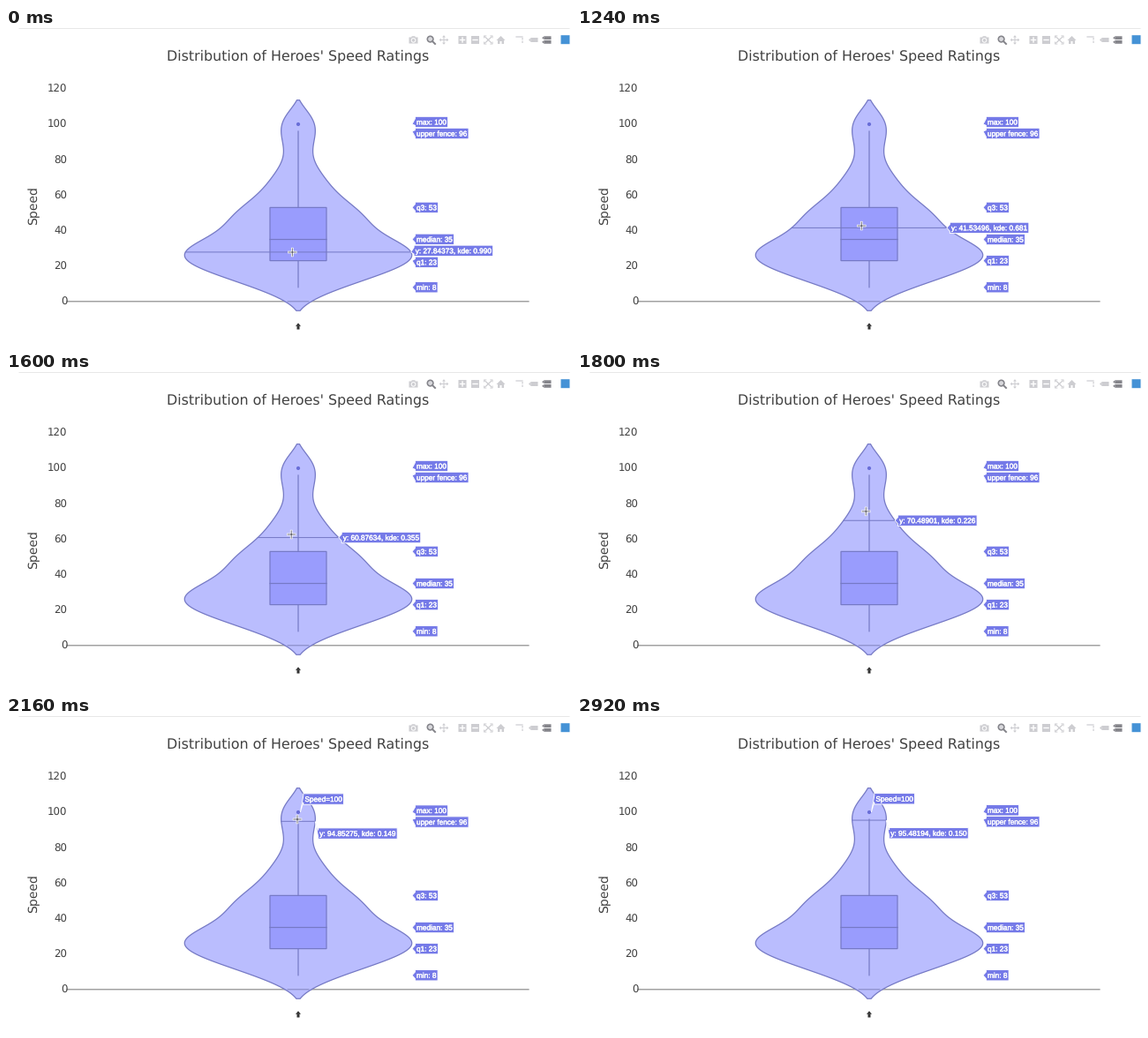
Recreate the animation shown at these times as a matplotlib script. Size 640 px wide and 358 px high, loop 2.96 s.

```python
import numpy as np
import matplotlib.pyplot as plt
from matplotlib.animation import FuncAnimation
from matplotlib.patches import Circle, Polygon, Rectangle
from matplotlib.patheffects import withStroke

W, H, DPI = 640, 358, 100
FRAMES, STEP = 74, 40
CX, ZERO, UNIT, PEAK = 331, 309.8, 2.008, 129
FILL, BOX, LINE, TAG = "#babdfe", "#999cfd", "#7579c5", "#757ae8"
INK, PALE, DARK, AXIS = "#414141", "#cdcdd1", "#85858b", "#8a8a8a"
STATS = {"max": 100, "upper fence": 96, "q3": 53, "median": 35, "q1": 23, "min": 8}

plt.rcParams["text.hinting"] = "none"
fig = plt.figure(figsize=(W / DPI, H / DPI), dpi=DPI, facecolor="white")
ax = fig.add_axes([0, 0, 1, 1])
ax.set_xlim(0, W)
ax.set_ylim(H, 0)
ax.axis("off")


def pt(px):
    return px * 72 / DPI


def to_y(value):
    return ZERO - value * UNIT


def line(xs, ys, color=LINE, px=1.0, z=3, **kw):
    return ax.plot(xs, ys, color=color, lw=pt(px), zorder=z, snap=False, **kw)[0]


def rect(x, y, w, h, color, z=2, edge="none", px=0):
    ax.add_patch(Rectangle((x, y), w, h, fc=color, ec=edge, lw=pt(px),
                           zorder=z, snap=False))


def disc(x, y, r, color, z=2, edge="none", px=0):
    ax.add_patch(Circle((x, y), r, fc=color, ec=edge, lw=pt(px), zorder=z))


def arrow_head(x, y, dx, dy, length, half, color):
    """Triangle with its tip at x, y, pointing along dx, dy."""
    tip, way, side = np.array([x, y]), np.array([dx, dy]), np.array([-dy, dx])
    base = tip - way * length
    ax.add_patch(Polygon([tip, base + side * half, base - side * half],
                         fc=color, ec="none", zorder=2))


def text(x, y, s, px, color=INK, font="DejaVu Sans", **kw):
    return ax.text(x, y, s, fontsize=pt(px), color=color, family=font,
                   va="baseline", **kw)


# Density: Gaussian kernels weighted to pass through a few known heights
CENTRES, HEIGHTS = np.array([
    (-5.2, .017), (3.5, .225), (11.5, .557), (19.4, .88), (27.844, .99),
    (38, .757), (47.978, .582), (54.8, .465), (60.876, .355), (69.7, .235),
    (78.179, .152), (87.2, .131), (94.853, .149), (104.6, .109), (113.6, .012)]).T
BANDWIDTH = 8.5


def kernels(v):
    return np.exp(-((np.atleast_1d(v)[:, None] - CENTRES) / BANDWIDTH) ** 2 / 2)


WEIGHTS = np.linalg.solve(kernels(CENTRES), HEIGHTS)


def density(v):
    return kernels(v) @ WEIGHTS


def draw_toolbar():
    y = 13.5
    # camera
    rect(456.5, 10.5, 10, 7, PALE)
    rect(459.5, 9.3, 4, 2, PALE)
    disc(461.5, 13.9, 2.3, PALE, 3, "white", 1)
    # magnifier
    disc(480.6, 12.6, 3.3, "#d8d8dc", 2, DARK, 1.6)
    line([483, 486], [15, 18], DARK, 2)
    # pan
    for dx, dy in ((1, 0), (-1, 0), (0, 1), (0, -1)):
        line([496, 496 + 4 * dx], [y, y + 4 * dy], PALE)
        arrow_head(496 + 5.3 * dx, y + 5.3 * dy, dx, dy, 2.2, 1.9, PALE)
    # zoom in and out
    for x in (517, 531.5):
        rect(x - 4.5, y - 4.5, 9, 9, PALE)
        line([x - 2.5, x + 2.5], [y, y], "white", 1.4)
    line([517, 517], [y - 2.5, y + 2.5], "white", 1.4)
    # autoscale
    for sx in (-1, 1):
        for sy in (-1, 1):
            line([546.3, 546.3 + 3.7 * sx], [y, y + 3.5 * sy], PALE, 1.2)
            line(546.3 + sx * np.array([2.5, 4.8, 4.8]),
                 y + sy * np.array([4.6, 4.6, 2.5]), PALE, 0.9)
    # home
    arrow_head(560.5, 9, 0, -1, 5, 5, PALE)
    rect(557, 13.5, 7, 4.5, PALE)
    rect(559.5, 15, 2, 3, "white", 3)
    # spike lines
    line([578, 585], [10, 10], PALE, 1.2)
    line([585, 585], [11, 18], PALE, 1.2, ls=(0, (2, 1)))
    # hover tags
    for x, mid, h, color in ((592, y, 5, PALE), (607, 11.2, 3.8, DARK), (607, 15.9, 3.8, DARK)):
        arrow_head(x, mid, -1, 0, 2.6, h / 2, color)
        rect(x + 2.5, mid - h / 2, 8, h, color)
    rect(628.5, 8.2, 10, 10, "#4592d6")


def draw_chart():
    line([15, 638], [0.5, 0.5], "#e8e8e8")
    text(CX, 37, "Distribution of Heroes' Speed Ratings", 15.85, ha="center")
    text(35.3, 201, "Speed", 14, ha="center", rotation=90, rotation_mode="anchor")
    for v in range(0, 121, 20):
        text(69.6, to_y(v) + 4.2, str(v), 11.7, ha="right")
    line([69, 592], [ZERO, ZERO], AXIS, 1.2, z=1)
    arrow_head(CX, 334.2, 0, -1, 3.6, 3, "#333333")
    rect(CX - 1.5, 337.5, 3, 4, "#333333")

    v = np.linspace(CENTRES[0], CENTRES[-1], 300)
    hw = PEAK * density(v)
    xs, ys = np.r_[CX - hw, (CX + hw)[::-1]], to_y(np.r_[v, v[::-1]])
    ax.add_patch(Polygon(np.column_stack([xs, ys]), fc=FILL, ec=LINE,
                         lw=pt(1.25), zorder=2))
    line([CX - 12, CX + 12], [ZERO, ZERO], "#8083bd")

    top, mid, low = (to_y(STATS[k]) for k in ("q3", "median", "q1"))
    rect(CX - 32, top, 64, low - top, BOX, 3, LINE, 1.2)
    line([CX - 32, CX + 32], [mid, mid], px=1.2, z=4)
    line([CX, CX], [to_y(STATS["upper fence"]), top], px=1.2, z=4)
    line([CX, CX], [low, to_y(STATS["min"])], px=1.2, z=4)
    disc(CX, to_y(STATS["max"]), 2.1, "#6a6fd8", 5)


class HoverTag:
    def __init__(self, label="", x=CX + PEAK, value=0):
        self.x, self.y = x, to_y(value)
        self.body = Polygon([(0, 0), (1, 0), (1, 1)], fc=TAG, ec="white",
                            lw=pt(0.9), zorder=8)
        ax.add_patch(self.body)
        self.label = text(x, 0, label, 8.25, "white", "Liberation Sans", zorder=9,
                          path_effects=[withStroke(linewidth=0.25, foreground="white")])

    def show(self, on):
        self.body.set_visible(on)
        self.label.set_visible(on)

    def place(self, mid):
        x, left, h, a = self.x, self.x + 3.4, 6.2, 3.8
        self.label.set_position((x + 5, mid + 2.95))
        right = x + 6.6 + self.label.get_window_extent().width
        self.body.set_xy([(x, self.y), (left, mid + a), (left, mid + h),
                          (right, mid + h), (right, mid - h), (left, mid - h),
                          (left, mid - a)])


def spread(ys, gap=13):
    """Push sorted positions apart, keeping each cluster centred."""
    blocks = []
    for i, y in enumerate(ys):
        blocks.append((y - i * gap, 1))
        while len(blocks) > 1 and blocks[-2][0] > blocks[-1][0]:
            (a, n), (b, m) = blocks[-2:]
            blocks[-2:] = [((a * n + b * m) / (n + m), n + m)]
    flat = [mean for mean, n in blocks for _ in range(n)]
    return [mean + i * gap for i, mean in enumerate(flat)]


draw_toolbar()
draw_chart()
point_tag = HoverTag("Speed=100", CX + 2.4, STATS["max"])
stat_tags = [HoverTag(f"{name}: {v}", value=v) for name, v in STATS.items()]
kde_tag = HoverTag()
kde_line = line([], [], z=6)
cross = [line([], [], c, px, z, solid_capstyle="butt")
         for c, px, z in (("white", 2.7, 10), ("#5f5f6c", 0.9, 11))]

# time, hovered value, pointer x, pointer y
PATH = np.array([
    (900, 27.84373, 324.3, 254), (1400, 47.97789, 321.3, 210),
    (1600, 60.87634, 323.2, 184), (1960, 78.17914, 330.5, 137),
    (2160, 94.85275, 330, 117), (2200, 95.48194, 330.2, 117)])
POINTER_GONE = 2720


def update(frame):
    t = frame * STEP
    value, mx, my = (np.interp(t, PATH[:, 0], col) for col in PATH.T[1:])
    y, kde = to_y(value), density(value)[0]
    hw = PEAK * kde
    kde_line.set_data([CX - hw, CX + hw], [y, y])

    kde_tag.x, kde_tag.y = CX + hw, y
    kde_tag.label.set_text(f"y: {value:.5f}, kde: {kde:.3f}")
    near = y < 125
    point_tag.show(near)
    tags = ([point_tag] if near else []) + stat_tags + [kde_tag]
    tags.sort(key=lambda tag: tag.y)
    for tag, mid in zip(tags, spread([tag.y for tag in tags])):
        tag.place(mid)

    for part, r in zip(cross, (5.2, 4.6)):
        part.set_data([mx - r, mx + r, np.nan, mx, mx], [my, my, np.nan, my - r, my + r])
        part.set_visible(t < POINTER_GONE)
    return []


anim = FuncAnimation(fig, update, frames=FRAMES, interval=STEP, repeat=True,
                     repeat_delay=0, blit=False)
plt.show()
```
